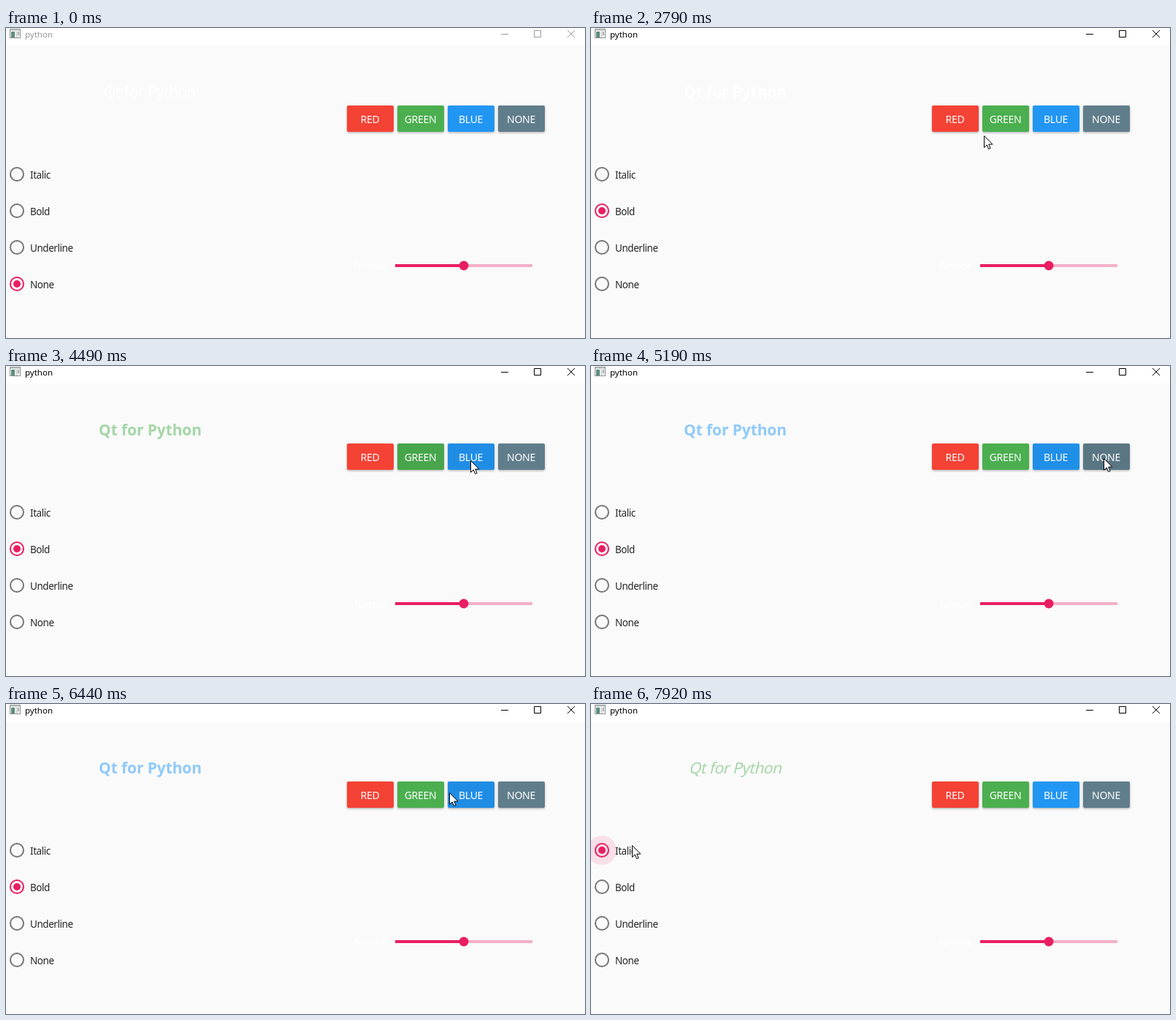
Recreate the animation shown at these times as an HTML page. Size 793 by 424 pixels, loop 8000 ms.

```html
<!DOCTYPE html>
<html lang="en">
<head>
<meta charset="utf-8">
<title>python</title>
<style>
  html, body { margin: 0; width: 100%; height: 100%; overflow: hidden; background: #fafafa; }
  svg { display: block; width: 793px; height: 424px; }
  text { font-family: "Noto Sans", "Open Sans", sans-serif; white-space: pre; }
  .label { font-size: 13.5px; font-weight: 500; letter-spacing: -.45px; fill: #262626; }
  .button { font-size: 14px; letter-spacing: -.3px; fill: #fff; text-anchor: middle; }
  #title { font-size: 21px; text-anchor: middle; }
</style>
</head>
<body>
<svg viewBox="0 0 793 424">
  <defs>
    <filter id="shadow" x="-10%" y="-15%" width="120%" height="140%">
      <feDropShadow dx="0" dy="1.3" stdDeviation="1.4" flood-color="#000" flood-opacity=".3"/>
    </filter>
  </defs>
  <rect width="793" height="424" fill="#fafafa"/>
  <rect width="793" height="24" fill="#fff"/>
  <g id="icon">
    <rect x="5.5" y="1.5" width="14" height="12" fill="#f4f4f4" stroke="#8d9494"/>
    <rect x="6" y="2" width="13" height="2" fill="#c9cfcf"/>
    <rect x="7" y="5" width="5" height="8" fill="#5d8e7e"/>
    <rect x="13" y="5" width="3" height="8" fill="#dcdcdc"/>
    <rect x="16" y="5" width="2" height="5" fill="#aab5b2"/>
  </g>
  <text id="caption" x="26" y="13" font-size="11.5">python</text>
  <path id="controls" d="M678 8.5h10M723.5 3.5h9v9h-9zM769 3l10 10M779 3l-10 10" fill="none"/>
  <text id="title" y="95">Qt for Python</text>
  <g id="buttons"></g>
  <g id="radios"></g>
  <text x="477" y="330" font-size="12" letter-spacing="-.4" fill="#fff">Fontsize</text>
  <path d="M627 325H721" stroke="#f4b0c8" stroke-width="4"/>
  <path d="M533 325H627" stroke="#e91e63" stroke-width="4"/>
  <circle cx="627" cy="325" r="6.5" fill="#e91e63"/>
  <path id="cursor" d="M.5 .5V16.5L4.2 13L6.7 18.6L9.1 17.6L6.7 12.1H11.9Z" fill="#fff" stroke="#000"/>
</svg>
<script>
const LOOP = 8000;
const PINK = '#e91e63';
const $ = id => document.getElementById(id);
const clamp = v => Math.max(0, Math.min(1, v));
const ease = k => k * k * (3 - 2 * k);

function set(el, attrs) {
  for (const key in attrs) el.setAttribute(key, attrs[key]);
}

function add(parent, tag, attrs, text) {
  const el = document.createElementNS('http://www.w3.org/2000/svg', tag);
  set(el, attrs);
  if (text) el.textContent = text;
  return parent.appendChild(el);
}

const buttons = [
  ['RED', '#f44336', '#ef9a9a'],
  ['GREEN', '#4caf50', '#a5d6a7'],
  ['BLUE', '#2196f3', '#90caf9'],
  ['NONE', '#607d8b', '#fff']
].map(([name, color, tint], i) => {
  const area = { x: 467 + 69 * i, y: 106, width: 64, height: 36 };
  add($('buttons'), 'rect', { ...area, rx: 2, fill: color, filter: 'url(#shadow)' });
  const shade = add($('buttons'), 'rect', { ...area, rx: 2 });
  add($('buttons'), 'text', { x: area.x + 31.5, y: 130, class: 'button' }, name);
  return { area, shade, tint };
});

const radios = ['Italic', 'Bold', 'Underline', 'None'].map((name, i) => {
  const cy = 200 + 50 * i;
  const circle = attrs => add($('radios'), 'circle', { cx: 15, cy, ...attrs });
  const halo = circle({ r: 20, fill: PINK });
  const ring = circle({ r: 9, fill: 'none', 'stroke-width': 2 });
  const dot = circle({ r: 5, fill: PINK });
  add($('radios'), 'text', { x: 33, y: cy + 5.5, class: 'label' }, name);
  return { name, halo, ring, dot, area: { x: 0, y: cy - 25, width: 100, height: 50 } };
});

const [red, green, blue, none] = buttons;
const [italic, bold, , plain] = radios;

// Pointer stops; a control named on a stop is clicked on leaving
const stops = [
  { arrive: 0, leave: 120, x: 467, y: 391 },
  { arrive: 960, leave: 1240, x: 45, y: 198, click: italic },
  { arrive: 1600, leave: 1610, x: 30, y: 246, click: bold },
  { arrive: 2700, leave: 2800, x: 538, y: 147 },
  { arrive: 3150, leave: 3380, x: 500, y: 126, click: red },
  { arrive: 3800, leave: 4100, x: 566, y: 124, click: green },
  { arrive: 4490, leave: 4780, x: 636, y: 129, click: blue },
  { arrive: 5150, leave: 5400, x: 702, y: 126, click: none },
  { arrive: 5800, leave: 6200, x: 642, y: 118, click: blue },
  { arrive: 6700, leave: 6740, x: 567, y: 125, click: green },
  { arrive: 6960, leave: 7010, x: 327, y: 210 },
  { arrive: 7500, leave: 7610, x: 56, y: 193, click: italic }
];
const firstClick = stops.find(s => s.click).leave;

function pointer(t) {
  const i = Math.max(0, stops.findLastIndex(s => s.arrive <= t));
  const a = stops[i];
  const b = stops[i + 1] || a;
  const k = a === b ? 0 : ease(clamp((t - a.leave) / (b.arrive - a.leave)));
  return { x: a.x + (b.x - a.x) * k, y: a.y + (b.y - a.y) * k };
}

const inside = ({ x, y }, r) =>
  x >= r.x && x < r.x + r.width && y >= r.y && y < r.y + r.height;

// 1 while the pointer is over the area, then a short hold and fade
function hover(area, t) {
  for (let age = 0; age < 480; age += 20) {
    if (inside(pointer(t - age), area)) return clamp(1.6 - age / 300);
  }
  return 0;
}

function lastClicked(group, t, initial) {
  const stop = stops.findLast(s => s.leave <= t && group.includes(s.click));
  return stop ? stop.click : initial;
}

function drawTitle(t, style) {
  const heavy = style === bold;
  set($('title'), {
    x: heavy ? 197.5 : 197,
    fill: lastClicked(buttons, t, none).tint,
    'font-weight': heavy ? 700 : 400,
    'letter-spacing': heavy ? -.1 : -.5,
    transform: style === italic ? 'translate(0 95) skewX(-14) translate(0 -95)' : ''
  });
}

function draw(t) {
  const chosen = lastClicked(radios, t, plain);
  const ink = t >= firstClick ? '#000' : '#999';
  set($('caption'), { fill: ink });
  set($('controls'), { stroke: ink });
  drawTitle(t, chosen);

  for (const { area, shade } of buttons) {
    set(shade, { 'fill-opacity': .06 * hover(area, t) });
  }
  for (const radio of radios) {
    const on = radio === chosen;
    set(radio.halo, { 'fill-opacity': on ? .12 * hover(radio.area, t) : 0 });
    set(radio.ring, { stroke: on ? PINK : '#757575' });
    set(radio.dot, { visibility: on ? 'visible' : 'hidden' });
  }

  const { x, y } = pointer(t);
  set($('cursor'), {
    transform: `translate(${Math.round(x)} ${Math.round(y)})`,
    visibility: t < stops[0].leave ? 'hidden' : 'visible'
  });
}

function tick() {
  draw(performance.now() % LOOP);
  requestAnimationFrame(tick);
}
tick();
</script>
</body>
</html>
```
